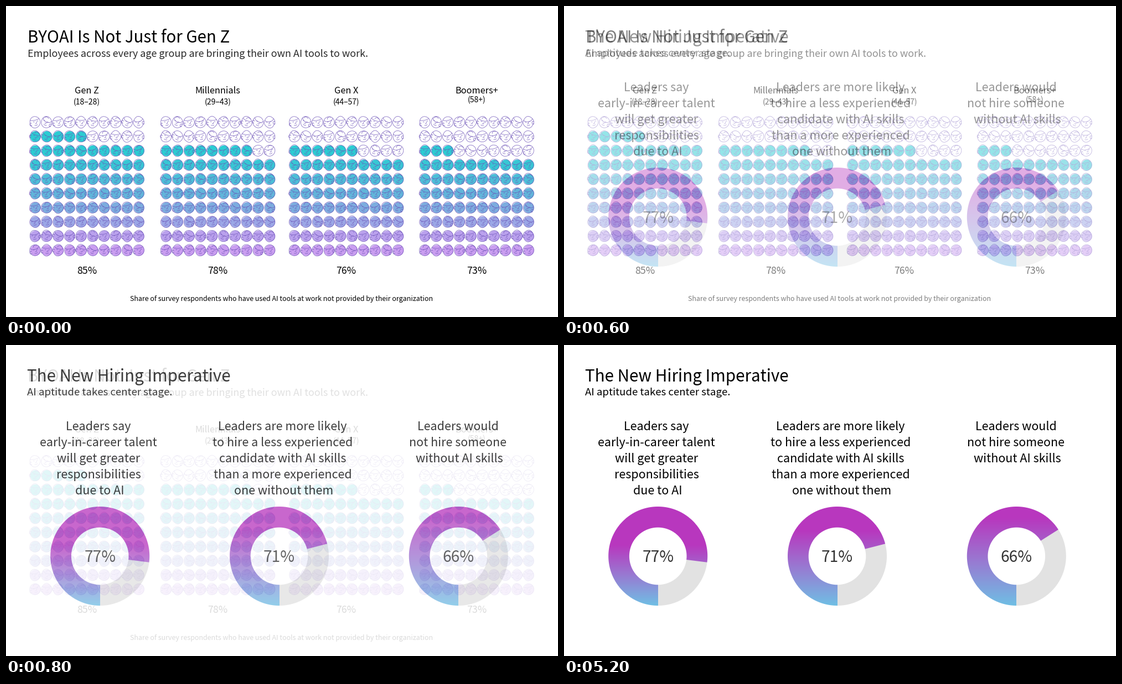
A matplotlib script that plays this animation: 997 px wide and 562 px high, repeating every 8 s.

```python
import numpy as np
import matplotlib.pyplot as plt
from matplotlib.animation import FuncAnimation
from matplotlib.collections import LineCollection, PolyCollection

W, H, DPI = 997, 562, 64
PT = 72 / DPI  # points per pixel
FRAMES, STEP = 80, 100
FADE_START, FADE_LEN = 4, 6

plt.rcParams["font.family"] = ["Noto Sans CJK JP", "DejaVu Sans"]
fig = plt.figure(figsize=(W / DPI, H / DPI), dpi=DPI, facecolor="white")
ax = fig.add_axes([0, 0, 1, 1])
ax.axis("off")


def label(x, y, text, px, ha="center", color="black", z=1):
    return ax.text(x, y, text, fontsize=px * PT, ha=ha, va="baseline",
                   color=color, zorder=z)


def ramp(x, start, end, colors):
    """Colour at x on an even gradient from start to end."""
    stops = np.linspace(start, end, len(colors))
    return np.stack([np.interp(x, stops, c) / 255 for c in zip(*colors)], -1)


# ---- first slide: crowds of little heads ----

GROUPS = [  # name, ages, share, centre x, ages baseline
    ("Gen Z", "(18–28)", 85, 146, 178),
    ("Millennials", "(29–43)", 78, 382.5, 178),
    ("Gen X", "(44–57)", 76, 614.5, 178),
    ("Boomers+", "(58+)", 73, 850, 174),
]
DX, DY, TOP = 20.8, 25.7, 210
HEAD_SIZE = np.array([9.4, 10.4])
TEAL, BLUE, PURPLE = (44, 204, 210), (108, 176, 220), (202, 158, 240)


def arc(cx, cy, rx, ry, start=0, end=360, n=12):
    a = np.radians(np.linspace(start, end, n))
    return np.column_stack([cx + rx * np.cos(a), cy + ry * np.sin(a)])


def head(seed):
    """Outline, hair and face strokes of one head in unit size."""
    rng = np.random.default_rng(seed)
    side = rng.choice([-1, 1])
    tilt = rng.uniform(-.4, .4)
    skull = arc(0, 0, 1, 1, n=25)
    skull *= 1 + rng.uniform(.02, .05) * np.cos(
        np.linspace(0, 2 * np.pi, 25) * rng.integers(2, 5))[:, None]
    strokes = [
        skull,
        arc(0, -.5, .82, rng.uniform(.15, .5), 0, 180),  # fringe
        arc(-side * .85, .25, .2, .25, 30, 330),         # ear
        arc(side * .15, .12, .16, .16, -60, 150, 7),     # nose
        arc(side * .1, .42, .32, .16, 20, 150, 7),       # mouth
    ]
    strokes += [arc(side * .15 + e, -.02, .14, .1, 200, 340, 6)
                for e in (-.36, .36)]
    if rng.random() < .5:
        strokes.append(arc(side * .2, -.62, .4, .25, 160, 340, 8))
    c, s = np.cos(tilt), np.sin(tilt)
    return [p @ [[c, s], [-s, c]] for p in strokes]


def crowd():
    heads = [head(seed) for seed in range(10)]
    disc = arc(.8, .3, 9.5, 9.9, n=25)
    lines, discs, colors = [], [], []
    for _, _, share, cx, _ in GROUPS:
        for n in range(100):
            row, col = divmod(n, 10)
            pos = np.array([cx + (col - 4.5) * DX, TOP + row * DY])
            lines += [pos + s * HEAD_SIZE for s in heads[(col + 7 * row) % 10]]
            if (9 - row) * 10 + col < share:
                discs.append(pos + disc)
                colors.append(ramp(row, 2.5, 8.5, [TEAL, BLUE, PURPLE]))
    return [PolyCollection(discs, facecolors=colors, edgecolors="none", zorder=0),
            LineCollection(lines, colors=[(.43, .33, .72, .85)],
                           linewidths=.8 * PT, zorder=1)]


first = crowd()
for c in first:
    ax.add_collection(c, autolim=False)

first += [
    label(39, 66, "BYOAI Is Not Just for Gen Z", 29.4, "left"),
    label(39, 92, "Employees across every age group are bringing "
          "their own AI tools to work.", 18, "left", "#2a2a2a"),
    label(497.5, 533, "Share of survey respondents who have used AI tools "
          "at work not provided by their organization", 12.43),
]
for name, ages, share, cx, ages_y in GROUPS:
    first += [label(cx, 157.5, name, 16.3), label(cx, ages_y, ages, 14),
              label(cx, 484, f"{share}%", 17.7)]

# ---- second slide: three rings ----

SHARES = [77, 71, 66]
RING_X, RING_DX, RING_Y = 169.7, 323.8, 381.5
R_OUT, R_IN = 89.5, 51.8
MAGENTA, VIOLET, SKY = (184, 55, 190), (152, 122, 210), (112, 190, 228)
GREY = 226 / 255


def paint_ring(img, cx, share):
    y, x = np.mgrid[0:H, 0:W] + .5
    dx, dy = x - cx, y - RING_Y
    d = np.hypot(dx, dy)
    turn = np.arctan2(-dx, dy) % (2 * np.pi)  # clockwise from the bottom
    part = np.clip(.5 + d * (2 * np.pi * share / 100 - turn), 0, 1)[..., None]
    fade_top = 312 + 4.5 * (share - 66)
    tint = ramp(y, fade_top, 470, [MAGENTA, VIOLET, SKY])
    cover = np.clip(R_OUT - d + .5, 0, 1) * np.clip(d - R_IN + .5, 0, 1)
    cover = cover[..., None]
    return img * (1 - cover) + cover * (tint * part + GREY * (1 - part))


second = [
    label(38, 66, "The New Hiring Imperative", 29.55, "left", z=6),
    label(38, 91, "AI aptitude takes center stage.", 18.6, "left", z=6),
]
sheet = np.ones((H, W, 3))
for i, share in enumerate(SHARES):
    cx = RING_X + i * RING_DX
    sheet = paint_ring(sheet, cx, share)
    second.append(label(cx, 392, f"{share}%", 28, color="#333333", z=6))
veil = ax.imshow(sheet, extent=(0, W, H, 0), aspect="auto",
                 interpolation="nearest", zorder=5)

CLAIMS = {
    167: "Leaders say\nearly-in-career talent\nwill get greater\n"
         "responsibilities\ndue to AI",
    499.5: "Leaders are more likely\nto hire a less experienced\n"
           "candidate with AI skills\nthan a more experienced\n"
           "one without them",
    816: "Leaders would\nnot hire someone\nwithout AI skills",
}
for cx, text in CLAIMS.items():
    lines = text.split("\n")
    for i, line in enumerate(lines):
        nudge = 2.5 if line == lines[-1] else 0  # last line sits a bit right
        second.append(label(cx + nudge, 154 + 29.1 * i, line, 21.5, z=6))

ax.set_xlim(0, W)
ax.set_ylim(H, 0)


def update(i):
    # the first slide fades out a little faster than the second fades in
    u = float(np.clip((i - FADE_START) / FADE_LEN, 0, 1))
    out = np.sin(u * np.pi / 2)
    into = 1 - (1 - u) ** 1.3
    veil.set_alpha(out)
    if out > 0:
        veil.set_data(1 - into / out * (1 - sheet))
    for a in first:
        a.set_visible(u < 1)
    for a in second:
        a.set_alpha(into)
    return [veil, *first, *second]


anim = FuncAnimation(fig, update, frames=FRAMES, interval=STEP,
                     repeat=True, repeat_delay=0, blit=False)
plt.show()
```
